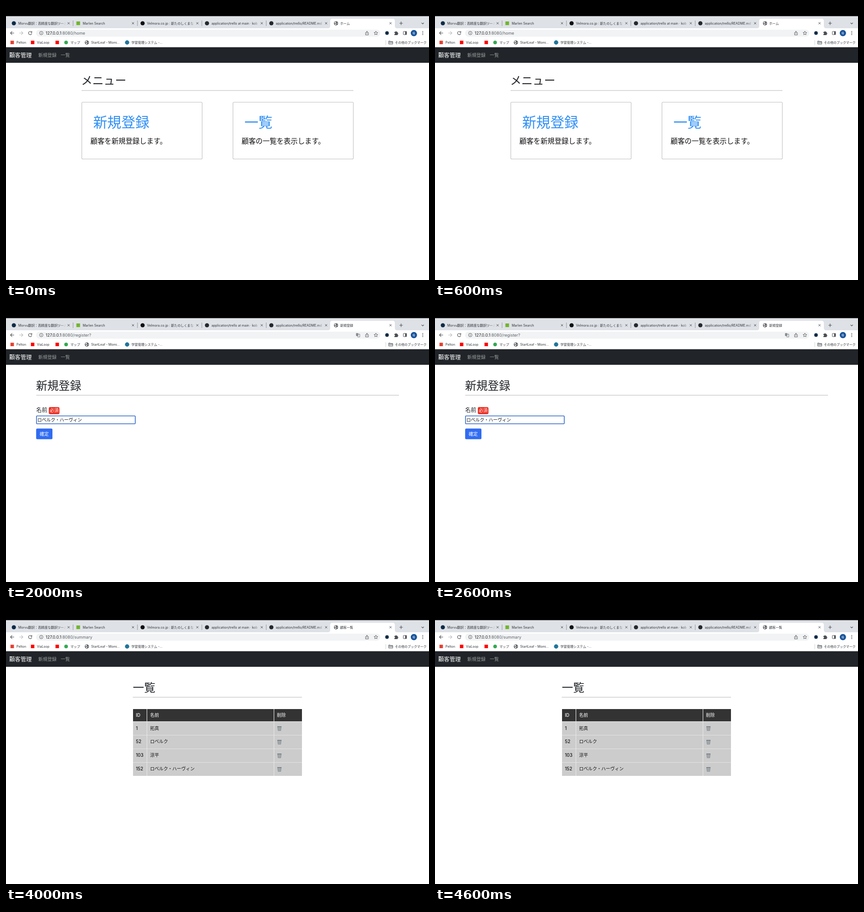
An HTML page that plays this animation: 929 px wide and 603 px high, repeating every 5 s.

```html
<!DOCTYPE html>
<html lang="ja">
<head>
<meta charset="utf-8">
<title>顧客管理</title>
<style>
  html, body { margin: 0; width: 100%; height: 100%; overflow: hidden; background: #fff; }
  svg { display: block; width: 929px; height: 603px; }
  text { font-family: Inter, "Noto Sans CJK JP", "Noto Sans CJK", sans-serif; white-space: pre; }
  .preview { filter: drop-shadow(0 1px 9px rgba(0, 0, 0, .25)); }
</style>
</head>
<body>
<svg id="stage" viewBox="0 0 929 603">
  <defs>
    <linearGradient id="fade">
      <stop offset="0" stop-color="#dee1e6" stop-opacity="0"/>
      <stop offset=".5" stop-color="#dee1e6"/>
    </linearGradient>
  </defs>
  <g id="view"></g>
</svg>
<script>
const INK = '#212529', ICON = '#4a4d51', LABEL = '#303337';

const text = (x, y, size, str, fill = INK, weight = 400) =>
  `<text x="${x}" y="${y}" font-size="${size}" fill="${fill}" font-weight="${weight}">${str}</text>`;
const body = (x, y, size, str, fill = '#111') => text(x, y, size, str, fill, 500);
const rect = (x, y, w, h, fill, extra = '') =>
  `<rect x="${x}" y="${y}" width="${w}" height="${h}" fill="${fill}" ${extra}/>`;
const disc = (x, y, r, fill) => `<circle cx="${x}" cy="${y}" r="${r}" fill="${fill}"/>`;
const line = (d, stroke = ICON, width = 1, fill = 'none') =>
  `<path d="${d}" fill="${fill}" stroke="${stroke}" stroke-width="${width}"/>`;
const box = (x, y, w, h, stroke, width = 1, r = 2) =>
  rect(x, y, w, h, '#fff', `rx="${r}" stroke="${stroke}" stroke-width="${width}"`);
const square = (x, y, size, fill) => rect(x - size / 2, y - size / 2, size, size, fill);

const globe = (x, y) => disc(x, y, 4.5, '#4f5358') +
  `<path transform="translate(${x} ${y})" fill="#fff" d="M-3.4-1Q-2.6-3.3-.2-3.5L.8-2.4-.6-1.4-1-.2-2.6 0ZM1.6-1.2L3.4-.6 3.4 1 2 .8ZM-2.8 1.2L.4.8 1.2 2-.4 3.5Q-2.3 3-2.8 1.2Z"/>`;

// Tabs: icon colour, title
const tabs = [
  ['#0f2b46', 'Morvu翻訳：高精度な翻訳ツール'],
  ['#72b52b', 'Marlen Search'],
  ['#111', 'Velmora.co.jp : 新たのしくまな'],
  ['#24292f', 'application/trello at main · kob'],
  ['#24292f', 'application/trello/README.md'],
];
const tabStep = 141.4;

function tabBar(title) {
  let out = rect(0, 22.6, 929, 26.4, '#dee1e6');
  tabs.forEach(([colour, name], i) => {
    const x = i * tabStep;
    out += (i === 1 ? square : disc)(x + 17.2, 38, i === 1 ? 8 : 4.6, colour) +
      text(x + 27, 40.5, 7.15, name, LABEL) +
      rect(x + 119, 30, 27, 16, 'url(#fade)');
    if (i < 4) out += rect(x + 146.8, 32, 1, 12, '#92969b');
  });
  out += `<path d="M707 49Q712 49 712 44V33Q712 28 717 28H849Q854 28 854 33V44Q854 49 859 49Z" fill="#fff"/>` +
    globe(724.8, 38) + text(734, 40.5, 7.1, title, LABEL);
  for (let i = 0; i < 6; i++) out += line(`M${i * tabStep + 135.2} 35.7l4.6 4.6m0-4.6l-4.6 4.6`);
  return out + line('M864 38h7.4M867.7 34.3v7.4M912.6 36.8l2.6 2.6 2.6-2.6', ICON, 1.1);
}

function toolbar(path, translate) {
  return rect(0, 49, 929, 42, '#fff') +
    rect(66, 52, 756, 15.5, '#f1f3f4', 'rx="7.75"') +
    line('M17.8 59.5H10M13.6 55.7L9.8 59.5l3.8 3.8', ICON, 1.1) +
    line('M29.2 59.5H37M33.4 55.7l3.8 3.8-3.8 3.8', '#b9bbbe', 1.1) +
    line('M55.8 57.2A3.6 3.6 0 1 0 56.6 60.2M56.8 55.4v2.8h-2.8', ICON, 1.1) +
    line('M81.3 59.5a3.8 3.8 0 1 1-7.6 0a3.8 3.8 0 1 1 7.6 0M77.5 59v2.5M77.5 57.2v1', ICON, .9) +
    text(87, 62.6, 9.05, `127.0.0.1<tspan fill="#5f6368">:8080/${path}</tspan>`, '#202124') +
    (translate ? line('M773.4 57.4h3.6v6.4h-4.4l-1-2', '#5f6368', .8) +
      rect(768.8, 55.4, 4.8, 6.2, '#7b7f84', 'rx=".6"') +
      line('M770 58.4h2.4M774.2 59.4h2.2M775.4 58.6q0 2.6-1.4 3.4', '#d5d7da', .6) : '') +
    line('M791.2 58.4h-1.5v5.3h6.2v-5.3h-1.5M792.8 61.4v-5.8M791 57.2l1.8-1.8 1.8 1.8', ICON, .9) +
    line('M812.4 55.4l1.2 2.7 2.9.3-2.2 2 .6 2.9-2.5-1.5-2.5 1.5.6-2.9-2.2-2 2.9-.3z', ICON, .9) +
    disc(836.8, 59.5, 3.9, '#0f2b46') +
    `<path d="M853 57h2.2a1.4 1.4 0 1 1 2.8 0h2.2v2.3a1.4 1.4 0 1 1 0 2.8v2H853v-2.2a1.4 1.4 0 0 0 0-2.8Z" fill="${ICON}"/>` +
    box(872.6, 56, 7.2, 7, ICON, 1, .6) + rect(876.6, 56, 3.2, 7, ICON) +
    disc(895.8, 59.6, 6.9, '#17539b') + text(893.1, 61.7, 5.4, '晴', '#fff') +
    [56.3, 59.5, 62.7].map(y => disc(915.3, y, 1, ICON)).join('');
}

function bookmarks() {
  const label = (x, str) => text(x, 82.6, 7.1, str, LABEL);
  return square(13.6, 80.2, 7.6, '#e34133') + label(23, 'Pelton') +
    square(58.5, 80.2, 7.6, '#f00') + label(68, 'ViaLoop') +
    square(112.5, 80.2, 7.6, '#f00') +
    disc(132, 80.2, 4, '#34a853') + label(141.5, 'マップ') +
    globe(177.6, 80.3) + label(187, 'StartLeaf - Momi...') +
    disc(266, 80.3, 4.7, '#21759b') + label(275.5, '学習管理システム -...') +
    rect(833.5, 75, 1, 11, '#cfd1d4') +
    line('M840.5 77h3.3l1 1.2h4.7v5.6h-9zM840.5 79.4h9', '#5f6368', 1, '#d5d7da') +
    text(854.3, 82.6, 6.95, 'その他のブックマーク', LABEL);
}

const chrome = (title, path, translate) =>
  rect(0, 0, 929, 603, '#fff') + rect(0, 0, 929, 22.6, '#000') +
  tabBar(title) + toolbar(path, translate) + bookmarks() +
  rect(0, 90.7, 929, 34.3, INK) +
  body(7.2, 112.5, 12.4, '顧客管理', '#fff') +
  text(70.9, 111.6, 10.05, '新規登録', '#9b9d9e') + text(120.2, 111.6, 10.05, '一覧', '#9b9d9e');

const heading = (x, y, str, left, width, ruleY) =>
  text(x, y, 24.8, str) + rect(left, ruleY, width, 1, '#b3b4b6');

function home() {
  const card = (x, title, note) => box(x + .5, 211.7, 264.3, 125, '#bdbdbd', 1.1) +
    text(x + 25.4, 267.2, 30.9, title, '#2f8ff5') + body(x + 19.5, 302.5, 15.4, note);
  return chrome('ホーム', 'home') + heading(165, 173.2, 'メニュー', 166, 597, 185.5) +
    card(166, '新規登録', '顧客を新規登録します。') +
    card(498, '一覧', '顧客の一覧を表示します。');
}

function preview() {
  return `<g class="preview">${rect(824, 530, 97, 66, '#fff', 'rx="3"')}</g>` +
    `<g transform="translate(826.3 532.7) scale(.1)">${home()}${rect(825, 530, 96, 50, '#c9cbce')}</g>`;
}

function register(name) {
  return chrome('新規登録', 'register?', true) + heading(66, 180, '新規登録', 66.5, 796.5, 191.5) +
    text(66.2, 229.1, 12.3, '名前') +
    rect(94, 218, 23.4, 15.8, '#ec2f22', 'rx="3"') + body(96, 229.4, 9.7, '必須', '#fff') +
    (name ? box(67, 237.5, 216.8, 17.3, '#2c66c8', 1.6, 1) : box(66.6, 237.2, 217.6, 18, '#767676', 1, 1)) +
    body(69, 249.8, 9.8, name) +
    rect(66.2, 265.2, 35.8, 23.6, '#306cf3', 'rx="2.5"') + body(73.9, 280.7, 10.1, '確定', '#fff');
}

function bin(y) {
  return `<g transform="translate(600.5 ${y})">` +
    line('M-4-4L-3 4.6H3L4-4Z', '#7f868c', .8, '#aab0b4') +
    line('M-1.6-3.5l.5 7.5M1.6-3.5l-.5 7.5M-3.6-1h7.2M-3.3 1.6h6.6', '#8d9499', .5) +
    line('M-4.6-4.2h9.2', '#62696f', 1.2) + '</g>';
}

const fullName = 'ロベルク・ハーヴィン';
const people = [[1, '拓真'], [52, 'ロベルク'], [102, '恒二'], [103, '涼平'], [152, fullName]];

function summary(list) {
  const row = (y, h, fill) => rect(279, y, 30, h, fill) + rect(310, y, 278, h, fill) + rect(589, y, 61, h, fill);
  const rows = list.map(([id, name], i) => {
    const y = 246 + i * 29.95;
    return row(y, 29.2, '#ccc') + body(285.3, y + 17.5, 9.8, id) +
      body(316.5, y + 17.5, 9.8, name) + bin(y + 14.9);
  }).join('');
  return chrome('顧客一覧', 'summary') + heading(278.5, 180, '一覧', 278.5, 371.5, 191.5) +
    rect(279, 245, 371, list.length * 29.95 + .2, '#ebebeb') +
    row(218, 27, '#333') + body(285.3, 235.2, 9.8, 'ID', '#fff') +
    body(316.5, 235.2, 9.8, '名前', '#fff') + body(595, 235.2, 9.8, '削除', '#fff') + rows;
}

const scenes = [
  home(),
  register('') + preview(),
  register(fullName),
  summary(people),
  summary(people.filter(([id]) => id !== 102)),
];

const view = document.getElementById('view');
let shown = -1;
function draw() {
  const scene = Math.floor(performance.now() % 5000 / 1000);
  if (scene !== shown) view.innerHTML = scenes[shown = scene];
  requestAnimationFrame(draw);
}
draw();
</script>
</body>
</html>
```
